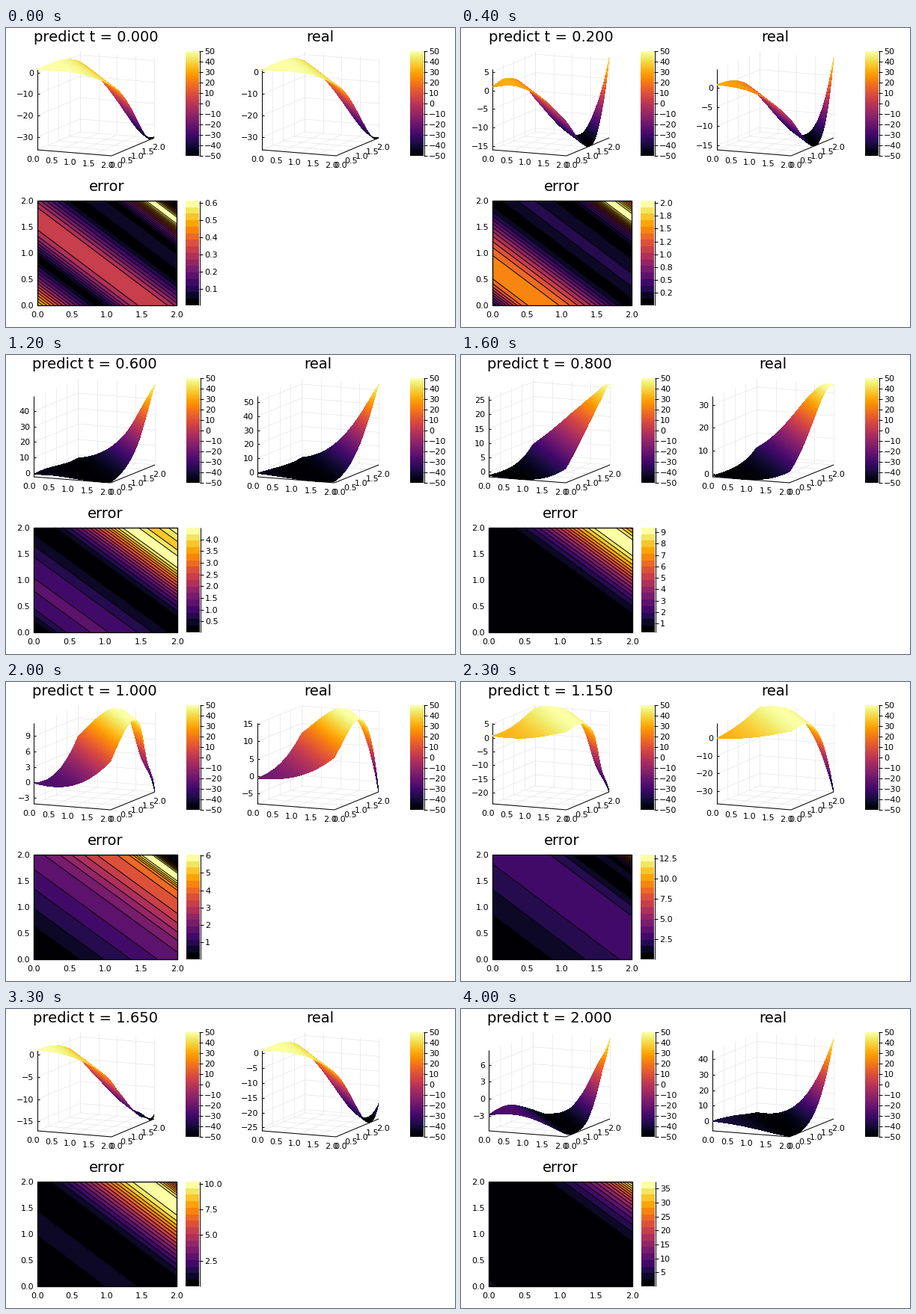
Write a matplotlib script that moves like this. It is 600x400 px and loops after 4.1 s.

```python
import numpy as np
import matplotlib.pyplot as plt
from matplotlib import colormaps
from matplotlib.animation import FuncAnimation
from matplotlib.collections import LineCollection, PolyCollection

plt.rcParams["font.family"] = "DejaVu Sans"
PX = 0.72          # one pixel in points at 100 dpi
EM = 8 / PX        # tick font size in pixels
INFERNO = colormaps["inferno"]
BANDS = 16
BAND_COLORS = INFERNO(np.linspace(0, 1, BANDS))
UNIT_TICKS = [0, 0.5, 1, 1.5, 2]

# Deviation of the prediction from the exact solution, sampled at s = x + y.
S_KNOTS = np.array([0, .5, .9, 1.35, 1.8, 2.25, 2.6, 2.95, 3.3, 3.65, 4])
T_KNOTS = np.array([0, .4, .8, 1.15, 1.45, 1.65, 2])
MISS = np.array([
    [.55, .22, 0, -.28, -.325, -.13, .02, .05, -.2, -.61, .1],
    [0, 2.05, 2.27, 1.75, .6, -.3, -.62, -.6, .1, 2.75, .9],
    [-.3, -.35, -.3, -.28, -.25, -.45, -1.9, -4.5, -7.7, -9.4, -6.9],
    [.75, -.15, -.9, -1.65, -2.4, -2.95, -2.95, -2, -.1, -.3, 13],
    [-1.1, -1.5, -1.85, -2.15, -2.1, -1.75, -.15, 2.3, 6.5, 13.5, 23.6],
    [.1, -.3, -.6, -.7, -.15, .9, 3.2, 6.2, 9.2, 9.9, 4.8],
    [-2.7, -1.4, -.4, .5, 1.1, .9, -.2, -3.5, -9.5, -20, -37.5],
])


def hermite(knots, values, x):
    """Cubic Hermite interpolation along the first axis."""
    slopes = np.gradient(values, knots, axis=0)
    i = np.clip(np.searchsorted(knots, x, side="right") - 1, 0, len(knots) - 2)
    h = knots[i + 1] - knots[i]
    u = (x - knots[i]) / h
    return ((1 + 2 * u) * (1 - u) ** 2 * values[i] + u * (1 - u) ** 2 * h * slopes[i]
            + u * u * (3 - 2 * u) * values[i + 1] + u * u * (u - 1) * h * slopes[i + 1])


def exact(s, t):
    return np.exp(s) * np.cos(s + 4 * t)


def deviation(s, t):
    return hermite(S_KNOTS, hermite(T_KNOTS, MISS, t), s)


def multiples(lo, hi, step):
    return step * np.arange(np.ceil(lo / step - 1e-9), np.floor(hi / step + 1e-9) + 1)


def axis_ticks(lo, hi):
    """Best scoring step by count, coverage, niceness and presence of zero."""
    span, best, chosen = hi - lo, -1, None
    top = int(np.ceil(np.log10(span)))
    for z in range(top, top - 3, -1):
        for q, nice in ((1, 1), (5, .9), (2, .7), (2.5, .5), (3, .2)):
            step = q * 10.0 ** z
            ticks = multiples(lo, hi, step)
            n = len(ticks)
            if not 4 <= n <= 8:
                continue
            score = ((1 - abs(n - 5) / 5) / 4 + (lo <= 0 <= hi) / 6
                     + span / ((n - 1) * step) / 2 + nice / 4)
            if score > best:
                best, chosen = score, (ticks, step)
    return chosen


def bar_ticks(lo, hi):
    """Smallest step of 1, 2.5 or 5 that gives at most ten intervals."""
    z = np.floor(np.log10(hi - lo)) - 1
    for q in (1, 2.5, 5, 10):
        step = q * 10.0 ** z
        if (hi - lo) / step <= 10.0001:
            return multiples(lo, hi, step), step


def labels(ticks, step):
    digits = 0 if abs(step - round(step)) < 1e-9 else 1
    return [f"{v + 0.0:.{digits}f}".replace("-", "\u2212") if abs(v) > 1e-9
            else f"{0:.{digits}f}" for v in ticks]


def label_width(text):
    wide = {".": .318, "\u2212": .838}
    return EM * sum(wide.get(c, .636) for c in text)


fig = plt.figure(figsize=(6, 4), dpi=100, facecolor="white")
ax = fig.add_axes([0, 0, 1, 1])


def write(x, y, text, ha="center"):
    ax.text(x, y, text, ha=ha, va="center_baseline", fontsize=8)


def title(x, y, text):
    ax.text(x, y, text, ha="center", va="baseline", fontsize=14)


def lines(segments, color="black", width=1.0, z=5):
    ax.add_collection(LineCollection(segments, colors=[color], linewidths=width * PX,
                                     zorder=z), autolim=False)


def colorbar(x, top, lo, hi, colors):
    bottom = top + 140
    ax.imshow(colors[::-1, None], extent=(x, x + 18, bottom, top), aspect="auto",
              interpolation="nearest", zorder=3)
    ticks, step = bar_ticks(lo, hi)
    segments = [[(x + 18.5, top), (x + 18.5, bottom)]]
    for v, text in zip(ticks, labels(ticks, step)):
        y = bottom - 140 * (v - lo) / (hi - lo)
        segments.append([(x + 18, y), (x + 23, y)])
        write(x + 25, y, text, "left")
    lines(segments)


GRID = np.linspace(0, 2, 49)
GX, GY = np.meshgrid(GRID, GRID)
GS = GX + GY
CX, CY = (a[:-1, :-1].ravel() for a in (GX, GY))
ORDER = np.argsort(CX - CY, kind="stable")     # far quads first


def surface(left, right, z, ticks, step):
    lo, hi = z.min(), z.max()
    width = right - left

    def point(x, y, h):
        return (left + width * (.635 * x + .365 * y) / 2,
                163 + 4 * x - 12 * y - 108 * h)

    def line(a, b):
        return [point(*a), point(*b)]

    grid = []
    for v in UNIT_TICKS:
        grid += [line((v, 0, 0), (v, 2, 0)), line((v, 2, 0), (v, 2, 1)),
                 line((0, v, 0), (2, v, 0)), line((0, v, 0), (0, v, 1))]
    heights = (ticks - lo) / (hi - lo)
    for h in heights:
        grid += [line((0, 0, h), (0, 2, h)), line((0, 2, h), (2, 2, h))]
    lines(grid, "#e6e6e6", .7, 1)

    level = (z - lo) / (hi - lo)
    pts = np.stack(point(GX, GY, level), axis=-1)
    corners = (np.s_[:-1, :-1], np.s_[:-1, 1:], np.s_[1:, 1:], np.s_[1:, :-1])
    quads = np.stack([pts[c].reshape(-1, 2) for c in corners], axis=1)
    shade = np.mean([level[c].ravel() for c in corners], axis=0)
    ax.add_collection(PolyCollection(quads[ORDER], facecolors=INFERNO(shade[ORDER]),
                                     edgecolors="none", antialiaseds=False, zorder=3),
                      autolim=False)

    frame = [line((0, 0, 0), (0, 0, 1)), line((0, 0, 0), (2, 0, 0)),
             line((2, 0, 0), (2, 2, 0))]
    for h, text in zip(heights, labels(ticks, step)):
        x, y = point(0, 0, h)
        frame.append([(x, y), (x + 2.5, y)])
        write(x - 5, y, text, "right")
    lines(frame, z=2)
    for v in UNIT_TICKS:
        x, y = point(v, 0, 0)
        write(x - 6, y + 12, f"{v:.1f}")
        x, y = point(2, v, 0)
        write(x + 6, y + 12, f"{v:.1f}")


def error_plot(left, right, error):
    lo, hi = error.min(), error.max()
    levels = np.linspace(lo, hi, BANDS + 1)
    px = left + (right - left) * GX / 2
    py = 371 - 70 * GY
    fill = levels.copy()
    fill[0] -= 1e-9
    fill[-1] += 1e-9
    ax.contourf(px, py, error, levels=fill, colors=BAND_COLORS, antialiased=False,
                zorder=2)
    ax.contour(px, py, error, levels=levels[1:-1], colors="black",
               linewidths=PX, zorder=3)
    lines([[(left, 231), (right, 231), (right, 371), (left, 371), (left, 231)]], width=1.3)
    for v in UNIT_TICKS:
        write(left - 5, 371 - 70 * v, f"{v:.1f}", "right")
        write(left + (right - left) * v / 2, 383, f"{v:.1f}")
    colorbar(right + 12, 231, lo, hi, BAND_COLORS)


def margin(ticks, step, least):
    return max(least, round(19 + max(map(label_width, labels(ticks, step)))))


def draw(frame):
    ax.cla()
    t = 0.05 * frame
    real = exact(GS, t)
    miss = deviation(GS, t)
    predict = real + miss

    ticks = axis_ticks(predict.min(), predict.max())
    left = margin(*ticks, 37)
    right = 198 if left > 40 else 199
    surface(left, right, predict, *ticks)
    title((left + right) / 2, 18, f"predict t = {t:.3f}")

    ticks = axis_ticks(real.min(), real.max())
    left2 = 300 + margin(*ticks, 36)
    surface(left2, 498, real, *ticks)
    title((left2 + 498) / 2, 18, "real")

    gradient = INFERNO(np.linspace(0, 1, 140))
    for x in (right + 42, 540):
        colorbar(x, 31, -50, 50, gradient)

    error_plot(left, right + 30, np.abs(miss))
    title((left + right + 30) / 2, 218, "error")

    ax.set_xlim(0, 600)
    ax.set_ylim(400, 0)
    ax.axis("off")
    return []


anim = FuncAnimation(fig, draw, frames=41, interval=100, repeat=True, repeat_delay=0)
plt.show()
```
